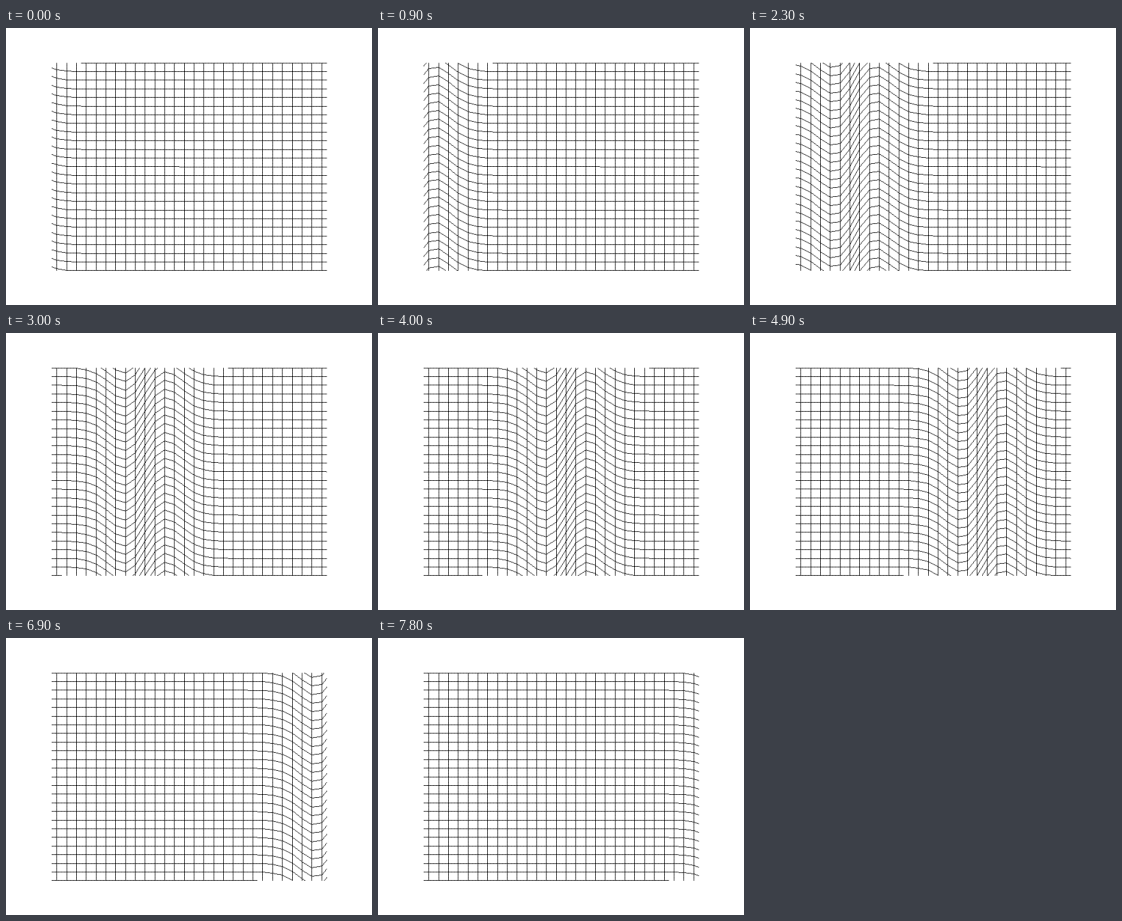
Write an HTML page with a canvas that moves like this. It is 366x277 px and loops after 7900 ms.

```html
<!DOCTYPE html>
<html lang="en">
<head>
<meta charset="utf-8">
<title>Transverse wave pulse</title>
<style>
html, body { margin: 0; width: 100%; height: 100%; overflow: hidden; background: #fff; }
canvas { display: block; }
</style>
</head>
<body>
<canvas width="366" height="277"></canvas>
<script>
// The grid is plotted with hard pixels on a large plane, then reduced to the stage.
const W = 366, H = 277, BIG_W = 610, BIG_H = 461;
const LEFT = 76, RIGHT = 534, TOP = 58, BOTTOM = 403, MID = 231;
const COLS = 28, COL = BIG_W * 0.75 / COLS, ROW = BIG_H * 0.75 / 24;
const STEP = 100, LOOP = 7900;

const ctx = document.querySelector('canvas').getContext('2d');
const image = ctx.createImageData(W, H);
const ink = new Uint8Array(BIG_W * BIG_H);
const cover = new Float32Array(W * H);

const colX = i => Math.round(76.2 + COL * (i + 0.5));
const rowY = t => MID + Math.floor(t);

// upward shift, in rows, at u columns from the pulse centre
function shift(u) {
  const s = 2 * u * Math.exp(-u * u / 9);
  return Math.abs(s) < 1e-15 ? 0 : s;
}

function plot(x, y) {
  if (x >= LEFT && x <= RIGHT && y >= TOP && y <= BOTTOM) ink[y * BIG_W + x] = 1;
}

function line(x0, y0, x1, y1) {
  const n = Math.max(x1 - x0, Math.abs(y1 - y0));
  for (let s = 0; s <= n; s++) {
    plot(Math.round(x0 + (x1 - x0) * s / n), Math.round(y0 + (y1 - y0) * s / n));
  }
}

// spread each inked pixel over the nearest stage pixels
function reduce() {
  const sx = W / BIG_W, sy = H / BIG_H;
  cover.fill(0);
  for (let y = TOP; y <= BOTTOM; y++) {
    const cy = (y + 0.5) * sy - 0.5, py = Math.floor(cy), fy = cy - py;
    for (let x = LEFT; x <= RIGHT; x++) {
      if (!ink[y * BIG_W + x]) continue;
      const cx = (x + 0.5) * sx - 0.5, px = Math.floor(cx), fx = cx - px;
      const p = py * W + px, a = sx * sy;
      cover[p] += a * (1 - fx) * (1 - fy);
      cover[p + 1] += a * fx * (1 - fy);
      cover[p + W] += a * (1 - fx) * fy;
      cover[p + W + 1] += a * fx * fy;
    }
  }
  cover.forEach((c, p) => {
    image.data.fill(255 * (1 - Math.min(1, c)), p * 4, p * 4 + 3);
    image.data[p * 4 + 3] = 255;
  });
  ctx.putImageData(image, 0, 0);
}

function draw(n) {
  const centre = n / 2 - 6;
  ink.fill(0);
  for (let i = 0; i < COLS; i++) line(colX(i), TOP, colX(i), BOTTOM);
  for (let i = -1; i < COLS; i++) {
    const a = shift(i - centre), b = shift(i + 1 - centre);
    for (let k = -16; k <= 16; k++) {
      line(colX(i), rowY(k * ROW - a * ROW), colX(i + 1), rowY(k * ROW - b * ROW));
    }
  }
  reduce();
}

let last = -1;
function tick() {
  const n = Math.floor(performance.now() % LOOP / STEP);
  if (n !== last) draw(last = n);
  requestAnimationFrame(tick);
}
tick();
</script>
</body>
</html>
```
